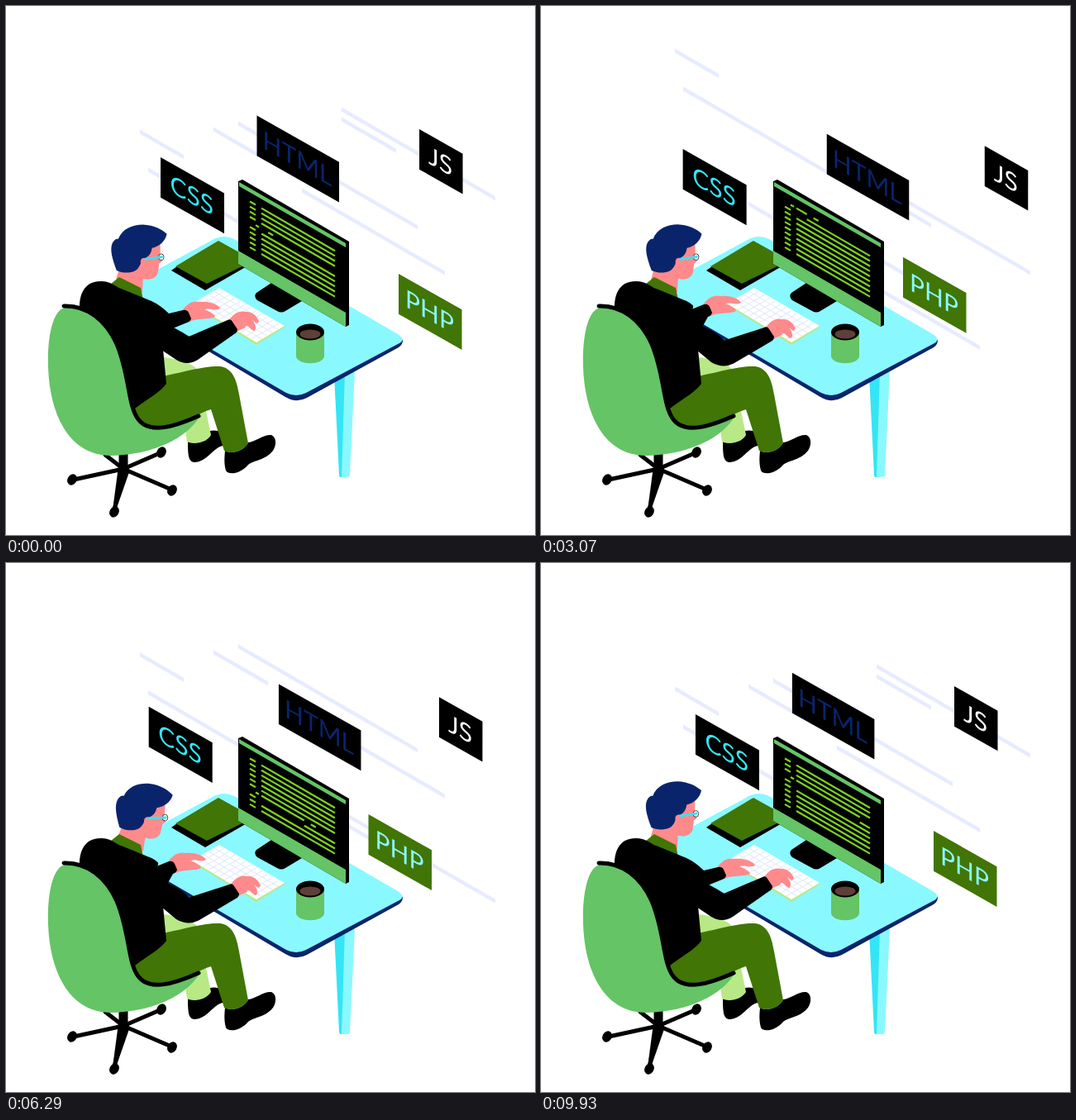
An HTML page for the animation above (10000 ms loop, 640x640 px).

```html
<!DOCTYPE html>
<html lang="en">
<head>
<meta charset="utf-8">
<title>Developer at a desk</title>
<style>
html, body { margin: 0; width: 100%; height: 100%; overflow: hidden; background: #fff; }
svg { display: block; width: 100vw; height: 100vh; }
text { font: 30px Lato, "Open Sans", sans-serif; text-anchor: middle; }
</style>
</head>
<body>
<svg viewBox="0 0 640 640">
  <g id="bars" fill="#e6ebff"></g>
  <g id="cards"></g>

  <!-- desk -->
  <path d="M397 446L411 443 408 570H405Q403 570 403 567Z" fill="#34e5f5"/>
  <path d="M410 443H422L416 567Q416 570 413 570H406Z" fill="#8af8ff"/>
  <path d="M131 350L338 473Q351 481 364 474L475 413Q480 410 480 404L440 400 150 330Z" fill="#0a246c"/>
  <path d="M131 347L248 284Q262 275 276 282L474 397Q485 404 474 409L363 468Q351 474 339 468Z" fill="#8af8ff"/>

  <!-- book -->
  <path d="M200 320L207 315 300 300V310L241 344Z"/>
  <path d="M205 315L257 284 300 308 243 336Z" fill="#417505"/>

  <!-- monitor -->
  <path d="M303 347L321 335 358 357 338 369Q333 372 328 369L304 356Q299 351 303 347Z"/>
  <path d="M281 212L286 210 415 285V386L411 388 281 312Z"/>
  <path d="M282 213L411 287V292L282 218ZM281 296L411 371V388L281 312Z" fill="#65c466"/>
  <g id="code" stroke="#7ed321" stroke-width="2.2"></g>

  <!-- keyboard -->
  <path d="M225 362L258 344 338 388 303 410Z" fill="#b8e986"/>
  <path d="M225 360L258 341 337 387 303 407Z" fill="#fff"/>
  <path id="keys" stroke="#e0e6fa" fill="none"/>

  <!-- mug -->
  <path d="M351 394V424C353 435 383 435 385 424V394Z" fill="#65c466"/>
  <ellipse cx="368" cy="394.500" rx="17" ry="10"/>
  <ellipse cx="368" cy="397" rx="12.500" ry="5.500" fill="#5d4037"/>

  <!-- far leg and shoes -->
  <path d="M185 424C206 427 226 431 232 441L195 470Z" fill="#b8e986"/>
  <path d="M220 527C229 531 242 525 247 514Q255 512 262 517V532C250 535 243 551 229 552 221 552 220 545 220 527Z"/>
  <path d="M241 485L248 519C242 529 227 531 219 527L216 505Z" fill="#b8e986"/>
  <path d="M265 538C275 543 289 537 293 528 302 527 312 518 321 519 328 522 327 532 323 538 313 550 301 549 293 555 284 566 269 568 266 562 264 555 264 548 265 538Z"/>

  <!-- chair -->
  <g stroke="#000" stroke-linecap="round">
    <path d="M142 538V560" stroke-width="11" stroke-linecap="butt"/>
    <path d="M142 560L82 573M142 560L131 610M142 560L200 585M142 560L186 541M142 560L120 543" stroke-width="5"/>
  </g>
  <path d="M136 557L148 557 149 564 133 610 129 610Z"/>
  <g id="casters"></g>
  <path d="M71 365C55 369 50 405 51 437 53 497 78 544 127 544 175 543 217 525 234 497L165 500 150 410 100 364Z" fill="#65c466"/>
  <path d="M155 486L180 450C215 443 240 435 259 436 274 438 279 452 282 470L293 529C286 540 271 542 264 538L248 488C235 492 215 504 200 510 180 513 160 507 155 486Z" fill="#417505"/>

  <!-- head -->
  <g id="head">
    <path d="M148 300L178 288 187 289V302L189 309 185.500 312 184 323C181 331 173 332 166 330L165 347 132 335 137 318Z" fill="#ff8a8c"/>
    <path d="M134 320C128 304 126 294 129 287 131 283 134 281 136 282 141 269 154 264.500 166 264.500 180 265 190 271 195 276 193 285 186 291 177 293 176 301 171 305 166 306 163 309 163 316 157 320 150 324 140 323 134 320Z" fill="#0a246c"/>
    <path d="M163 309C163 304 171 303 171 309 171 316 163 321 163 309Z" fill="#ff8a8c"/>
    <ellipse cx="188" cy="304" rx="3.300" ry="3.900" fill="#ffffffa0" stroke="#222" stroke-width=".8"/>
    <path d="M168 306.500L190 303.500" stroke="#34e5f5" stroke-width="2.800"/>
  </g>
  <path d="M127 336L137 328 163 341 166 356Z" fill="#417505"/>

  <!-- arms and jacket -->
  <path id="farHand" fill="#ff8a8c" d="M214 367C220 360 226 356 234 358 244 357 256 360 259 366 254 369 246 365 240 367 246 370 252 372 253 376 246 380 232 377 222 382Z"/>
  <path id="farArm"/>
  <path d="M89 368C88 346 97 332 116 333 124 333 130 337 137 341L176 357 190 385 190 415 194 457C186 468 170 476 156 487 148 465 142 420 120 386 112 372 98 367 89 368Z"/>
  <path id="nearHand" fill="#ff8a8c" d="M270 380C276 371 283 368 290 370 298 369 304 376 306 381 304 387 300 381 298 380 303 386 303 392 300 393 296 392 294 386 290 387 291 390 285 390 278 395Z"/>
  <path id="nearArm"/>
  <path d="M70 363C98 362 121 380 134 409 150 447 147 483 160 500 174 519 206 508 233 496" fill="none" stroke="#000" stroke-width="5" stroke-linecap="round"/>
</svg>
<script>
const LOOP = 10000, HALF = LOOP / 2, SLOPE = 0.58;
const $ = id => document.getElementById(id);

function add(parent, tag, attrs) {
  const el = document.createElementNS("http://www.w3.org/2000/svg", tag);
  for (const k in attrs) el.setAttribute(k, attrs[k]);
  return parent.appendChild(el);
}

const clamp = x => Math.max(0, Math.min(1, x));
// eased 0 to 1 between times a and b
const ramp = (t, a, b) => (1 - Math.cos(Math.PI * clamp((t - a) / (b - a)))) / 2;
// up between a and b, down again between c and d
const pulse = (t, a, b, c, d) => ramp(t, a, b) - ramp(t, c, d);
const wave = t => (1 - Math.cos(2 * Math.PI * t / HALF)) / 2;

// background bars: left, width, resting y, time of the jump to the bottom
const bars = [
  [162, 53, 152, 3500],
  [172, 174, 198, 4200],
  [251, 66, 149, 2290],
  [281, 217, 142, 1450],
  [358, 173, 223, 2950],
  [406, 66, 137, 750],
  [406, 186, 125, 170]
].map(([x, w, y, jump]) => {
  const d = `M${x} ${y - 2.5}l${w} ${w * SLOPE}v5l${-w} ${-w * SLOPE}Z`;
  return { jump, leaving: add($("bars"), "path", { d }), coming: add($("bars"), "path", { d }) };
});

function drawBars(t) {
  const place = (el, y, opacity) => {
    el.setAttribute("transform", `translate(0 ${y})`);
    el.setAttribute("opacity", clamp(opacity));
  };
  for (const b of bars) {
    place(b.leaving, -0.0319 * t, (b.jump - t) / 160);
    place(b.coming, 0.0485 * Math.max(0, 4930 - t), (t - b.jump) / 120);
  }
}

// language cards, each sliding along its own slope
const cards = [
  { name: "CSS", x: 187, y: 183, w: 77, fill: "#000", ink: "#34e5f5", slope: 0.65,
    move: t => -24 * (pulse(t, 0, 2150, 2150, 4400) + pulse(t, 5000, 7300, 7900, LOOP)) },
  { name: "HTML", x: 303.5, y: 132.5, w: 99.5, fill: "#000", ink: "#0a246c", slope: 0.525,
    move: t => 50 * wave(t) - 1.6 * Math.sin(4 * Math.PI * t / HALF) },
  { name: "JS", x: 500, y: 149, w: 52.5, fill: "#000", ink: "#fff", slope: 0.55,
    move: t => 43 * wave(t + 50) },
  { name: "PHP", x: 475, y: 324, w: 76.5, fill: "#417505", ink: "#8af8ff", slope: 0.545,
    move: t => -48 * pulse(t, 0, 4500, 4500, LOOP) }
];
for (const c of cards) {
  c.g = add($("cards"), "g", {});
  add(c.g, "rect", { width: c.w, height: 48.7, fill: c.fill });
  add(c.g, "text", { x: c.w / 2 - 0.7, y: 35, fill: c.ink }).textContent = c.name;
}

function drawCards(t) {
  for (const c of cards) {
    const dx = c.move(t);
    c.g.setAttribute("transform", `matrix(1 .565 0 1 ${c.x + dx} ${c.y + dx * c.slope})`);
  }
}

// code on the screen: a cursor runs down ten rows and retypes each
const ROWS = 10, LEFT = 309, RIGHT = 398;
const rows = Array.from({ length: ROWS }, () => add($("code"), "path", {}));

function drawCode(t) {
  const cursor = (t + 2000) % HALF / HALF * ROWS;
  const line = Math.floor(cursor);
  const x = LEFT + (cursor - line) * (RIGHT - LEFT);
  rows.forEach((row, i) => {
    const parts = i === line ? [[302, 306], [LEFT, x], [x + 8, x + 14]]
      : i === line + 1 ? [[295, 302], [x, RIGHT]]
      : [[295, 302], [LEFT, RIGHT]];
    const at = x => `${x} ${236.5 + i * 6.15 + (x - 295) * SLOPE}`;
    row.setAttribute("d", parts.filter(p => p[1] <= RIGHT)
      .map(([a, b]) => `M${at(a)}L${at(b)}`).join(""));
  });
}

// keyboard grid
let grid = "";
for (let i = 1; i < 12; i++) grid += `M${225 + i * 6.5} ${360 + i * 3.92}l33 -19`;
for (let i = 1; i < 5; i++) grid += `M${225 + i * 6.6} ${360 - i * 3.8}l78 47`;
$("keys").setAttribute("d", grid);

for (const [x, y] of [[80, 573], [131, 612], [201, 586], [188, 540]])
  add($("casters"), "ellipse", { rx: 5.5, ry: 7, transform: `translate(${x} ${y}) rotate(30)` });

function drawMan(t) {
  const tilt = 7.6 * pulse((t + 800) % HALF, 0, 2000, 3050, 4400) - 2.9;
  $("head").setAttribute("transform", `rotate(${tilt} 140 360)`);

  const far = pulse(t, 0, 750, 3700, 4900), fx = -17 * far, fy = -7 * far;
  $("farHand").setAttribute("transform", `translate(${fx} ${fy})`);
  $("farArm").setAttribute("d", `M150 352L176 357Q187 362 ${197 + fx * 0.8} ${372 + fy * 0.8}
    L${214 + fx} ${368 + fy}Q${219 + fx} ${367 + fy} ${221 + fx} ${371 + fy}
    L${224 + fx} ${378 + fy}Q${223 + fx} ${382 + fy} ${219 + fx} ${383 + fy}L192 394 180 395Z`);

  const near = pulse(t, 0, 350, 4000, 4900), nx = 2 * near, ny = 9 * near;
  $("nearHand").setAttribute("transform", `translate(${nx} ${ny})`);
  $("nearArm").setAttribute("d", `M162 357L180 360 192 387Q206 389 ${221 + nx / 2} ${400 + ny / 2}
    L${268 + nx} ${380 + ny}Q${272 + nx} ${378 + ny} ${274 + nx} ${382 + ny}
    L${280 + nx} ${391 + ny}Q${280 + nx} ${395 + ny} ${276 + nx} ${397 + ny}
    L${232 + nx / 2} ${428 + ny / 2}Q${219 + nx / 2} ${436 + ny / 3} 206 ${428 + ny / 3}L188 416 160 385Z`);
}

function draw(now) {
  const t = now % LOOP, half = t % HALF;
  drawBars(half);
  drawCards(t);
  drawCode(half);
  drawMan(half);
}

const start = performance.now();
function tick() {
  draw(performance.now() - start);
  requestAnimationFrame(tick);
}
tick();
</script>
</body>
</html>
```
